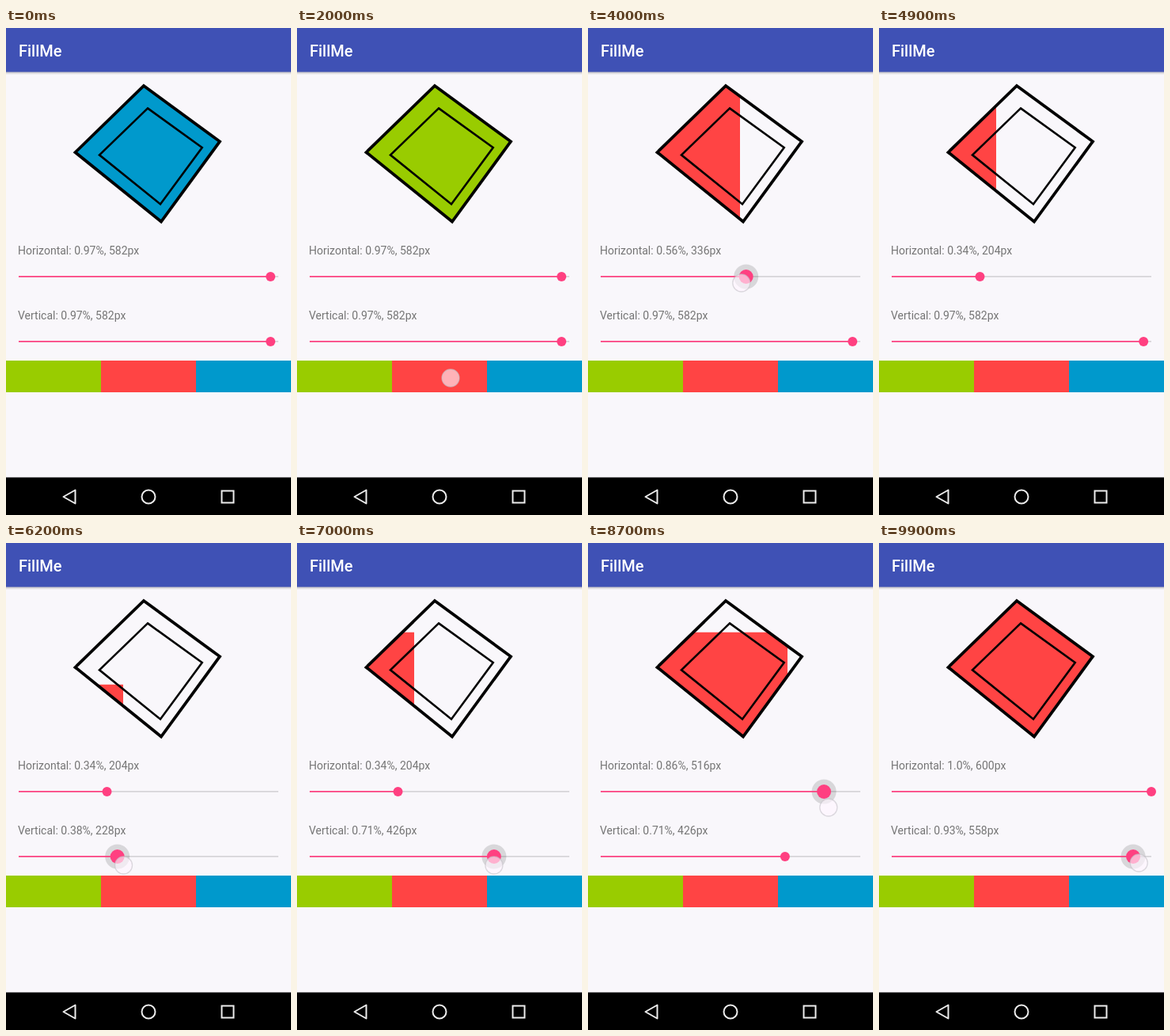
Animation, 360 px wide and 615 px high, one loop 10000 ms. Source, as an HTML page:

```html
<!DOCTYPE html>
<html lang="en">
<head>
<meta charset="utf-8">
<title>FillMe</title>
<style>
html, body { margin: 0; width: 100%; height: 100%; overflow: hidden; background: #f9f7fb; }
svg { display: block; width: 360px; height: 615px; }
text { font-family: Roboto, "Open Sans", sans-serif; }
.label { font-size: 14px; fill: #757575; }
.nav { fill: none; stroke: #ececec; stroke-width: 2; }
</style>
</head>
<body>
<svg viewBox="0 0 360 615">
  <defs>
    <linearGradient id="shade" x2="0" y2="1">
      <stop offset="0" stop-color="#000" stop-opacity=".25"/>
      <stop offset="1" stop-color="#000" stop-opacity="0"/>
    </linearGradient>
    <clipPath id="reveal"><rect id="window" x="80"/></clipPath>
  </defs>
  <rect width="360" height="615" fill="#f9f7fb"/>
  <rect y="55" width="360" height="4" fill="url(#shade)"/>
  <rect width="360" height="55.5" fill="#3f51b5"/>
  <text x="16" y="36" font-size="20" font-weight="500" fill="#fff">FillMe</text>

  <path id="fill" clip-path="url(#reveal)" d="M174 73L270 143L196 244L88 157Z"/>
  <g fill="none" stroke="#000">
    <path stroke-width="3.8" d="M174 73L270 143.300L196 244.500L87.500 157Z"/>
    <path stroke-width="2.6" d="M179 101.400L247.700 151L195 222.500L118 160.300Z"/>
  </g>

  <g id="sliders"></g>
  <g id="swatches"></g>

  <rect y="567.5" width="360" height="48" fill="#000"/>
  <path class="nav" stroke-linejoin="round" d="M72.500 592L87.500 583.500V600.500Z"/>
  <circle class="nav" cx="180" cy="592" r="8.500"/>
  <rect class="nav" x="272.500" y="584.500" width="15" height="15"/>

  <circle id="finger" r="11" fill="#fff6ff" fill-opacity=".62" stroke="#c4c2c8" stroke-opacity=".6" stroke-width="1.300"/>
</svg>
<script>
const LOOP = 10000, STEP = 100, LEAD = 40;
const GREEN = '#9c0', RED = '#f44', BLUE = '#09c', PINK = '#ff4081';

const horizontal = { name: 'Horizontal', y: 314, haloDelay: 350 };
const vertical = { name: 'Vertical', y: 396, haloDelay: 0 };
const axes = [horizontal, vertical];

const gestures = [
  { from: 500, to: 700, x: 65, y: 440, color: GREEN },
  { from: 1900, to: 2100, x: 194, y: 442, color: RED },
  { from: 3050, to: 4600, axis: horizontal, dy: 8 },
  { from: 5000, to: 7000, axis: vertical, dy: 11 },
  { from: 7500, to: 9300, axis: horizontal, dy: 20 },
  { from: 9450, to: LOOP, axis: vertical, dy: 8 }
];

// each move slides an axis steadily to a new share
const moves = [
  { axis: horizontal, from: 3150, to: 4460, share: .34 },
  { axis: vertical, from: 5200, to: 5900, share: .2 },
  { axis: vertical, from: 5900, to: 6750, share: .71 },
  { axis: horizontal, from: 7600, to: 9000, share: 1 },
  { axis: vertical, from: 9500, to: LOOP, share: .985 }
];

const $ = id => document.getElementById(id);
const ramp = (t, a, b) => Math.min(1, Math.max(0, (t - a) / (b - a)));
const thumbX = share => 16 + 328 * share;

function set(el, attrs) {
  for (const k in attrs) el.setAttribute(k, attrs[k]);
}
function add(parent, tag, attrs) {
  const el = document.createElementNS('http://www.w3.org/2000/svg', tag);
  set(el, attrs);
  return parent.appendChild(el);
}

// rises after a gesture starts, falls after it ends
function pulse(t, g, rise, delay = 0) {
  const start = g.from + delay;
  return Math.min(ramp(t, start, start + rise), 1 - ramp(t, g.to, g.to + 200));
}

const shareAt = (axis, t) => moves
  .filter(m => m.axis === axis)
  .reduce((p, m) => p + (m.share - p) * ramp(t, m.from, m.to), .97);

[GREEN, RED, BLUE].forEach((fill, i) =>
  add($('swatches'), 'rect', { x: 120 * i, y: 420, width: 120, height: 40, fill }));

for (const a of axes) {
  const g = $('sliders'), line = { x: 16, y: a.y - 1, width: 328, height: 1.7 };
  a.label = add(g, 'text', { class: 'label', x: 15, y: a.y - 28 });
  add(g, 'rect', { ...line, fill: '#d6d4d8' });
  a.halo = add(g, 'circle', { cy: a.y, r: 15.5 });
  a.bar = add(g, 'rect', { ...line, fill: PINK });
  a.thumb = add(g, 'circle', { cy: a.y, fill: PINK });
}

function drawAxis(a, t) {
  const n = Math.round(shareAt(a, t) * 100), share = n / 100, cx = thumbX(share);
  const drags = gestures.filter(g => g.axis === a);
  const press = Math.max(...drags.map(g => pulse(t, g, 450)));
  const halo = Math.max(...drags.map(g => pulse(t, g, 250, a.haloDelay)));
  a.label.textContent = `${a.name}: ${n === 100 ? '1.0' : share}%, ${n * 6}px`;
  set(a.bar, { width: cx - 16 });
  set(a.thumb, { cx, r: 6 + 3 * press });
  set(a.halo, { cx, opacity: .13 * halo });
  return share;
}

function drawFinger(t) {
  const g = gestures.findLast(g => t >= g.from) || gestures[0];
  set($('finger'), {
    cx: g.axis ? thumbX(shareAt(g.axis, t + LEAD)) : g.x,
    cy: g.axis ? g.axis.y + g.dy : g.y,
    opacity: pulse(t, g, 100)
  });
}

function draw(time) {
  const t = Math.floor(time % LOOP / STEP) * STEP;
  const [h, v] = axes.map(a => drawAxis(a, t));
  const tap = gestures.findLast(g => g.color && t >= g.to);
  set($('window'), { y: 254.8 - 200 * v, width: 200 * h, height: 200 * v });
  set($('fill'), { fill: tap ? tap.color : BLUE });
  drawFinger(t);
}

let start;
function tick(now) {
  start ??= now;
  draw(now - start);
  requestAnimationFrame(tick);
}
draw(0);
requestAnimationFrame(tick);
</script>
</body>
</html>
```
